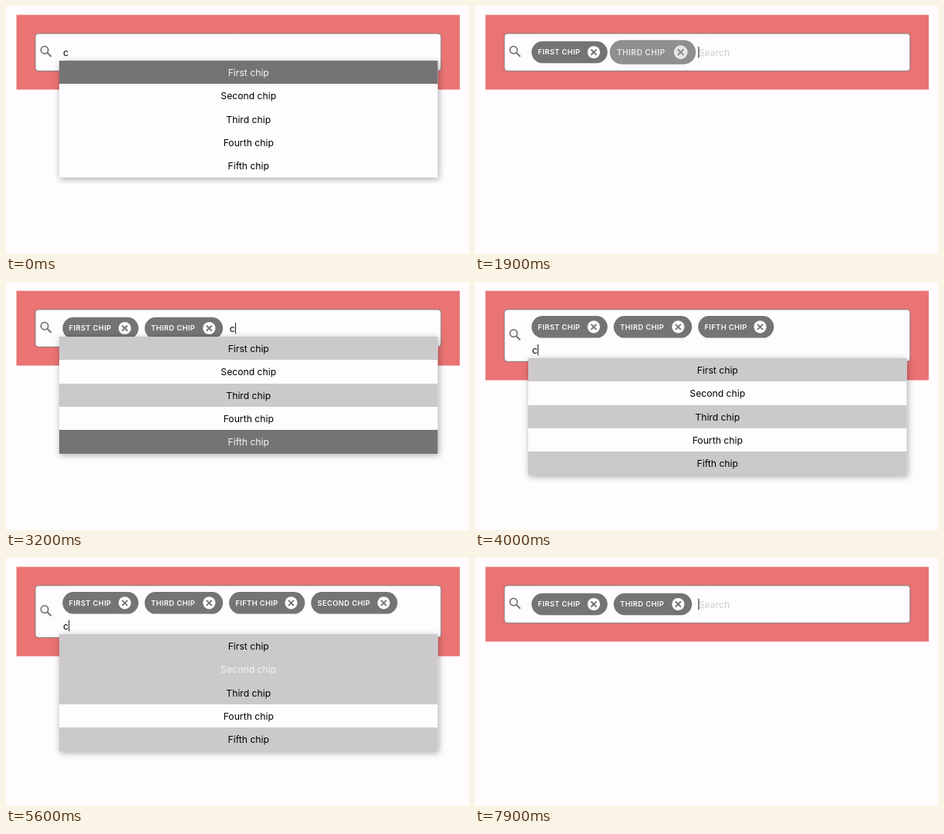
Write an HTML page with a canvas that moves like this. It is 600 px wide and 322 px high and loops after 8 s.

```html
<!DOCTYPE html>
<html lang="en">
<head>
<meta charset="utf-8">
<title>Chip search</title>
<style>
  html, body { margin: 0; width: 100%; height: 100%; overflow: hidden; background: #fefcfe; }
  canvas { display: block; }
</style>
</head>
<body>
<canvas id="stage" width="600" height="322"></canvas>
<script>
const ctx = document.getElementById('stage').getContext('2d');
const LOOP = 8000, TICK = 100, BLINK = 500, GROW = 200;
const PAPER = '#fefcfe', DARK = '#757376', LIGHT = '#cbc9cc', CORAL = '#ea7373';
const FONT = 'Inter, "Open Sans", sans-serif';
const TEXT_FONT = `400 12.2px ${FONT}`;
const CHIP_FONT = `600 9.3px ${FONT}`;

const OPTIONS = ['First', 'Second', 'Third', 'Fourth', 'Fifth'].map(name => name + ' chip');
const CHIP_WIDTHS = [98.4, 112, 101.4, 111.7, 98.2];
const CHIP_H = 28.6, GAP = 8, LEFT = 73.3, RIGHT = 564, INPUT_MIN = 190;
const LIST = { x: 69, w: 490.5, row: 30.35 };

const EVENTS = [
  [100, 'pick'], [900, 'type'], [1200, 'down'], [1300, 'down'], [1500, 'down'],
  [1800, 'pick'], [2200, 'type'], [2400, 'down'], [2600, 'down'], [2800, 'down'],
  [3000, 'down'], [3200, 'down'],
  [3600, 'pick'], [4000, 'type'], [4200, 'down'], [4400, 'down'],
  [4900, 'pick'], [5200, 'type'], [5400, 'down'], [5600, 'down'], [5800, 'down'],
  [6300, 'down'],
  [6700, 'pick'], [7300, 'erase'], [7600, 'erase'], [7900, 'erase']
];

const ACTIONS = {
  type(s, at) { s.query = 'c'; s.active = -1; s.caretStart = at; },
  down(s) { s.active++; },
  pick(s, at) {
    s.chips.push({ option: s.active, born: at });
    s.query = '';
    s.caretStart = at;
  },
  erase(s) { s.chips.pop(); }
};

function stateAt(t) {
  const s = { chips: [], query: 'c', active: 0, caretStart: -BLINK };
  for (const [at, action] of EVENTS) if (at <= t) ACTIONS[action](s, at);
  return s;
}

// Places chips and the input in wrapping rows.
function layout(chips) {
  let x = LEFT, row = 0;
  const placed = chips.map(chip => {
    const w = CHIP_WIDTHS[chip.option];
    if (x + w > RIGHT) { x = LEFT; row = 1; }
    const item = { ...chip, x, w, row };
    x += w + GAP;
    return item;
  });
  const chipWrapped = row === 1;
  if (x + INPUT_MIN > RIGHT) { x = LEFT; row = 1; }
  return {
    placed,
    inputX: x + 0.7,
    inputY: row === 0 ? 60 : chipWrapped ? 95.3 : 88,
    rowY: [row === 0 ? 60 : 58.3, 95.3],
    bottom: row === 0 ? 84.3 : chipWrapped ? 117.8 : 103.3
  };
}

function roundRect(x, y, w, h, r) {
  ctx.beginPath();
  ctx.roundRect(x, y, w, h, r);
}

function label(text, x, y, color, font = TEXT_FONT, align = 'left', spacing = 0) {
  ctx.font = font;
  ctx.fillStyle = color;
  ctx.textAlign = align;
  ctx.letterSpacing = spacing + 'px';
  ctx.fillText(text, x, y);
}

function drawSearchIcon(y) {
  ctx.strokeStyle = DARK;
  ctx.lineWidth = 1.8;
  ctx.beginPath();
  ctx.arc(50, y - 2, 4.7, 0, Math.PI * 2);
  ctx.stroke();
  ctx.lineWidth = 2;
  ctx.beginPath();
  ctx.moveTo(53.3, y + 1.3);
  ctx.lineTo(58.6, y + 6.6);
  ctx.stroke();
}

function drawChip(chip, cy, t) {
  const p = Math.min(1, (t - chip.born) / GROW);
  if (p <= 0) return;
  const scale = p < 0.5 ? 2.2 * p : 1.2 - 0.2 * p;
  const { w } = chip;
  ctx.save();
  ctx.globalAlpha = Math.min(1, p * 1.6);
  ctx.translate(chip.x + w / 2, cy);
  ctx.scale(scale, scale);
  roundRect(-w / 2, -CHIP_H / 2, w, CHIP_H, CHIP_H / 2);
  ctx.fillStyle = DARK;
  ctx.fill();
  label(OPTIONS[chip.option].toUpperCase(), 8.3 - w / 2, 3.4, PAPER, CHIP_FONT, 'left', 0.4);

  ctx.translate(w / 2 - 17.8, 0);
  ctx.beginPath();
  ctx.arc(0, 0, 8.1, 0, Math.PI * 2);
  ctx.fillStyle = PAPER;
  ctx.fill();
  ctx.beginPath();
  for (const side of [-1, 1]) {
    ctx.moveTo(-3.5, -3.5 * side);
    ctx.lineTo(3.5, 3.5 * side);
  }
  ctx.strokeStyle = DARK;
  ctx.lineWidth = 1.9;
  ctx.stroke();
  ctx.restore();
}

function drawList(s, top) {
  const { x, w, row } = LIST;
  ctx.save();
  ctx.shadowColor = 'rgba(0,0,0,.32)';
  ctx.shadowBlur = 8;
  ctx.shadowOffsetX = 1;
  ctx.shadowOffsetY = 2;
  ctx.fillStyle = PAPER;
  ctx.fillRect(x, top, w, row * OPTIONS.length);
  ctx.restore();

  OPTIONS.forEach((text, i) => {
    const y = top + i * row;
    const chosen = s.chips.some(chip => chip.option === i);
    const active = i === s.active;
    if (chosen || active) {
      const y0 = Math.round(y);
      ctx.fillStyle = chosen ? LIGHT : DARK;
      ctx.fillRect(x, y0, w, Math.round(y + row) - y0);
    }
    label(text, x + w / 2, y + 20, active ? '#f5f3f5' : '#000', TEXT_FONT, 'center');
  });
}

function draw(t) {
  const s = stateAt(t);
  const { placed, inputX, inputY, rowY, bottom } = layout(s.chips);

  ctx.fillStyle = PAPER;
  ctx.fillRect(0, 0, 600, 322);
  ctx.fillStyle = CORAL;
  ctx.fillRect(13.5, 11.5, 574.5, bottom + 12.7);

  roundRect(38, 35.8, 525.8, bottom - 35.8, 4);
  ctx.fillStyle = PAPER;
  ctx.fill();
  ctx.strokeStyle = DARK;
  ctx.lineWidth = 0.9;
  ctx.stroke();
  drawSearchIcon((35.8 + bottom) / 2 - 0.9);

  for (const chip of placed) drawChip(chip, rowY[chip.row], t);

  const baseline = inputY + 4.7;
  label(s.query || 'Search', inputX, baseline, s.query ? '#000' : '#cfcdd0');
  const caretOn = Math.floor((t - s.caretStart) / BLINK) % 2 === 0;
  if (caretOn) {
    const caretX = inputX + (s.query ? ctx.measureText(s.query).width + 0.2 : -0.4);
    ctx.fillStyle = '#111';
    ctx.fillRect(caretX, inputY - 7.2, 1, 14.4);
  }

  if (s.query) drawList(s, inputY + 11);
}

const start = performance.now();
function frame(now) {
  const t = Math.max(0, now - start) % LOOP;
  draw(Math.floor(t / TICK) * TICK);
  requestAnimationFrame(frame);
}
draw(0);
requestAnimationFrame(frame);
</script>
</body>
</html>
```
